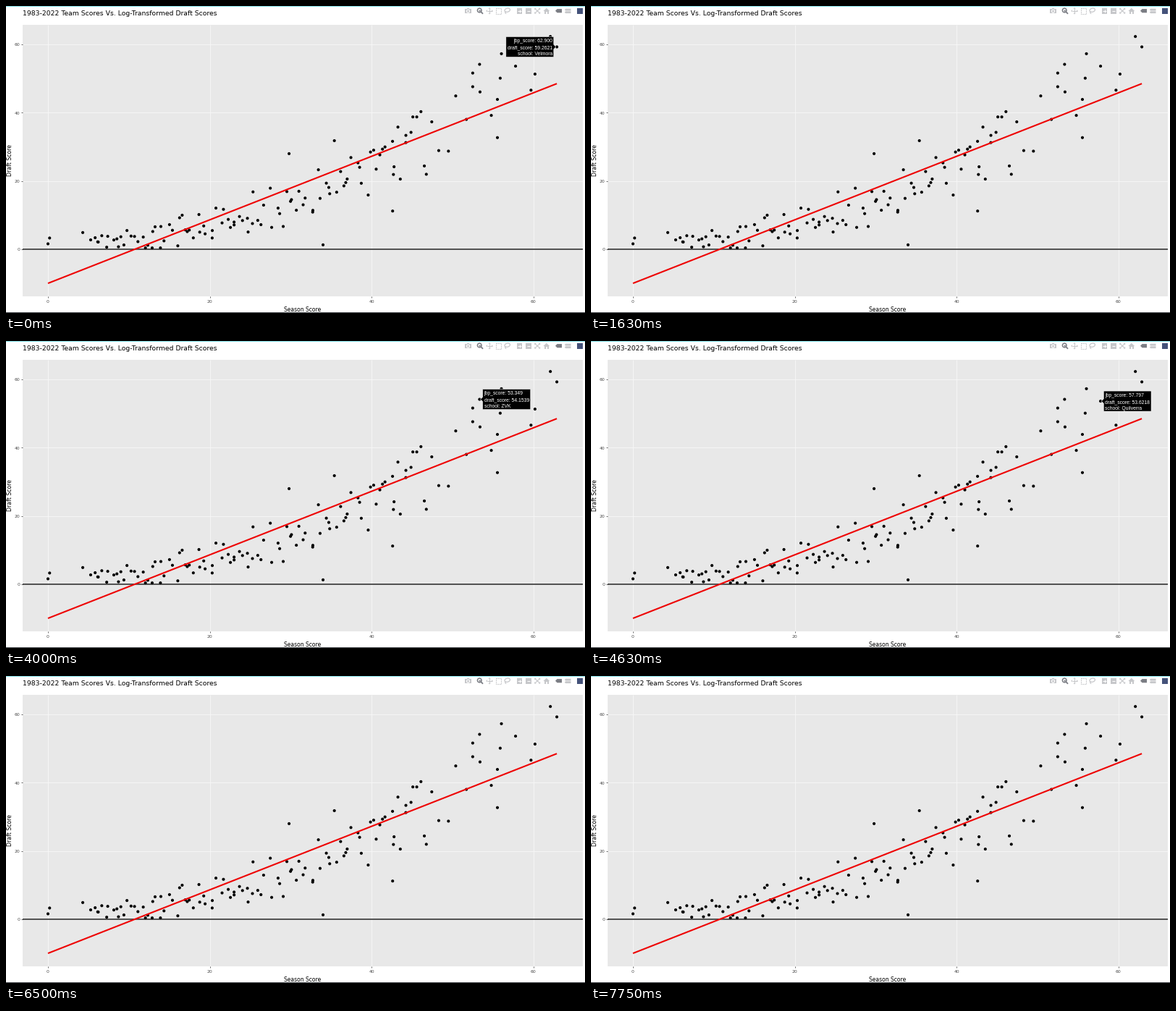
These frames come from a looping animation (800x424 px, 8000 ms). A matplotlib script:

```python
import numpy as np
import matplotlib.pyplot as plt
from matplotlib.animation import FuncAnimation
from matplotlib.patches import Circle, Ellipse, Polygon, Rectangle

W, H, DPI = 800, 424, 100
STEP, FRAMES = 125, 64
PT = 72 / DPI
LIGHT, ACTIVE = "#c6c7ca", "#7b7d84"

# start ms, end ms, season score, draft score, school, side
HOVERS = [
    (0, 1625, 62.9, 59.2621, "Velmora", -1),
    (2125, 3375, 56.05, 57.2601, "Tarno (QD)", 1),
    (3500, 4375, 53.349, 54.1539, "ZVK", 1),
    (4625, 4750, 57.797, 53.6218, "Quilverra", 1),
    (4875, 6500, 59.704, 46.5909, "Ferrowen", 1),
    (7625, 7750, 55.553, 43.8770, "Northern Galdovia State", 1),
]
# Teams that stand apart from the main cloud
OUTLIERS = [(0, 1.6), (0.2, 3.3), (4.3, 4.9), (62.1, 62.3), (60.2, 51.3),
            (55.9, 50.1), (52.5, 51.6), (52.5, 47.6), (50.4, 44.9),
            (54.8, 39.2), (48.3, 28.9), (46.1, 40.3), (35.4, 31.8),
            (29.8, 28), (42.6, 11.2), (34, 1.3), (42.7, 21.9)]

fig = plt.figure(figsize=(W / DPI, H / DPI), dpi=DPI, facecolor="white")
ax = fig.add_axes([0, 0, 1, 1])
ax.set_xlim(0, W)
ax.set_ylim(H, 0)
ax.axis("off")


def sx(v):
    return 58 + 11.178 * v


def sy(v):
    return 336 - 4.717 * v


def rect(x0, y0, x1, y1, color, z=1, **kw):
    return ax.add_patch(Rectangle((x0, y0), x1 - x0, y1 - y0, fc=color,
                                  zorder=z, **{"lw": 0, **kw}))


def poly(pts, color, z=5, **kw):
    return ax.add_patch(Polygon(pts, fc=color, zorder=z, **{"lw": 0, **kw}))


def line(xs, ys, color, w=1.0, z=2, **kw):
    return ax.plot(xs, ys, color=color, lw=w * PT, zorder=z,
                   solid_capstyle="butt", **kw)[0]


def label(x, y, s, size, color="black", font="DejaVu Sans", z=6, **kw):
    return ax.text(x, y, s, fontsize=size * PT, color=color, family=font,
                   zorder=z, **kw)


def panel():
    rect(0, 0, W, 1, "#7cdbe2")
    rect(0, 423, W, H, "#33373b")
    rect(23, 26, 797, 400.5, "#e8e8e8")
    for v in (0, 20, 40, 60):
        x, y = sx(v), sy(v)
        line([x, x], [26, 400.5], "#f7f7f7", 0.9)
        line([23, 797], [y, y], "#f7f7f7", 0.9)
        line([x, x], [400.5, 402.7], "#444444", 0.8)
        line([20.8, 23], [y, y], "#444444", 0.8)
        label(x, 410, str(v), 6.2, "#4d4d4d", ha="center", va="baseline")
        label(19.4, y + 2.3, str(v), 6.2, "#4d4d4d", ha="right", va="baseline")
    label(23, 13, "1983-2022 Team Scores Vs. Log-Transformed Draft Scores", 9.33)
    label(410, 421.6, "Season Score", 7.7, ha="center", va="baseline")
    label(7.6, 212.7, "Draft Score", 7.8, rotation=90, ha="center",
          va="baseline", rotation_mode="anchor")


def cloud(n=107):
    """Scores scattered around a quadratic trend, wider as they rise."""
    rng = np.random.default_rng(7)
    u = np.linspace(0, 1, n)
    season = np.interp(u, [0, 0.5, 0.96, 1], [5.2, 26, 47, 55.5])
    season += rng.uniform(-0.3, 0.3, n)
    noise = np.clip(rng.normal(0, 1, n), -1.6, 1.6)
    draft = 2 + 0.0135 * season ** 2 + noise * (1.3 + 0.1 * season)
    return zip(season, np.maximum(draft, 0.4))


def scatter():
    hovered = [spec[2:4] for spec in HOVERS]
    for season, draft in [*OUTLIERS, *hovered, *cloud()]:
        ax.add_patch(Circle((sx(season), sy(draft)), 2.05, fc="black", lw=0,
                            zorder=3))
    rect(23, 335.3, 797, 336.6, "black", 4, snap=False)
    line([58, 761.1], [383, 107.2], "#ee0505", 2.1, 4)


def arrow_head(x, y, dx, dy, r=1.7):
    poly([(x + dx * r, y + dy * r), (x - dy * r, y + dx * r),
          (x + dy * r, y - dx * r)], LIGHT)


def toolbar():
    # camera
    rect(634, 4, 643, 10.3, LIGHT, 5)
    rect(636.6, 2.8, 640.4, 4.5, LIGHT, 5)
    ax.add_patch(Circle((638.5, 7.1), 2, fc=LIGHT, ec="white", lw=0.8, zorder=6))
    # magnifier
    ax.add_patch(Circle((654.2, 6), 2.8, fc="none", ec=ACTIVE, lw=1.1, zorder=5))
    line([656.2, 659], [8, 10.8], ACTIVE, 1.8, 5)
    line([652.7, 655.7], [6, 6], ACTIVE, 0.9, 5)
    line([654.2, 654.2], [4.5, 7.5], ACTIVE, 0.9, 5)
    # pan
    line([664.5, 671.5], [6.8, 6.8], LIGHT, 1, 5)
    line([668, 668], [3.3, 10.3], LIGHT, 1, 5)
    for dx, dy in ((1, 0), (-1, 0), (0, 1), (0, -1)):
        arrow_head(668 + 3 * dx, 6.8 + 3 * dy, dx, dy)
    # box and lasso select
    rect(676.5, 3, 684, 10.5, "none", 5, ec=LIGHT, lw=0.8, ls=(0, (1.5, 0.9)))
    ax.add_patch(Ellipse((692.7, 5.7), 7.6, 5, angle=-15, fc="none",
                         ec=LIGHT, lw=0.9, zorder=5))
    line([690, 689.6, 691.2], [7.6, 9.2, 10.8], LIGHT, 1.1, 5)
    # zoom in and out
    for x in (709.5, 721.7):
        rect(x - 3.9, 2.9, x + 3.9, 10.7, LIGHT, 5)
        line([x - 2.2, x + 2.2], [6.8, 6.8], "white", 1.1, 6)
    line([709.5, 709.5], [4.6, 9], "white", 1.1, 6)
    # autoscale
    for s in (-1, 1):
        line([731, 737.4], [6.8 - 3 * s, 6.8 + 3 * s], LIGHT, 1.1, 5)
        for t in (-1, 1):
            cx, cy = 734.2 + 4 * s, 6.8 + 3.8 * t
            poly([(cx, cy), (cx - 2.6 * s, cy), (cx, cy - 2.6 * t)], LIGHT)
    # home
    poly([(742.3, 7.1), (746.8, 2.9), (751.3, 7.1)], LIGHT)
    rect(743.6, 7, 750, 10.5, LIGHT, 5)
    rect(745.8, 7.8, 747.8, 10.5, "white", 6)
    # hover tags
    poly([(759, 6.7), (761.5, 4.1), (768, 4.1), (768, 9.3), (761.5, 9.3)], ACTIVE)
    for y in (3.8, 7.3):
        poly([(771.8, y + 1.4), (773.2, y), (780.5, y), (780.5, y + 2.8),
              (773.2, y + 2.8)], LIGHT)
    rect(788.5, 2.6, 796.8, 10.9, "#44527a", 5)


def tooltip(season, draft, school, side):
    """Hover label beside a point; side is 1 for right, -1 for left."""
    x, y = sx(season), sy(draft)
    rows = (f"jbp_score: {season:.3f}", f"draft_score: {draft:.4f}",
            f"school: {school}")
    texts = [label(x + 6.2 * side, y - 6.3 + 9 * i, s, 6.8, "white",
                   "Liberation Sans", 9, va="baseline",
                   ha="left" if side > 0 else "right")
             for i, s in enumerate(rows)]
    width = max(t.get_window_extent().width for t in texts) + 3.8
    near, far = x + 4.3 * side, x + (4.3 + width) * side
    box = poly([(x + 1.2 * side, y), (near, y - 3.2), (near, y - 14),
                (far, y - 14), (far, y + 14), (near, y + 14), (near, y + 3.2)],
               "black", 8, ec="white", lw=0.35)
    return [box, *texts]


panel()
scatter()
toolbar()
tips = [(start, end, tooltip(*spec)) for start, end, *spec in HOVERS]


def update(n):
    t = n * STEP
    for start, end, parts in tips:
        for p in parts:
            p.set_visible(start <= t < end)
    return [p for *_, parts in tips for p in parts]


anim = FuncAnimation(fig, update, frames=FRAMES, interval=STEP, repeat=True,
                     repeat_delay=0, blit=False)
plt.show()
```
